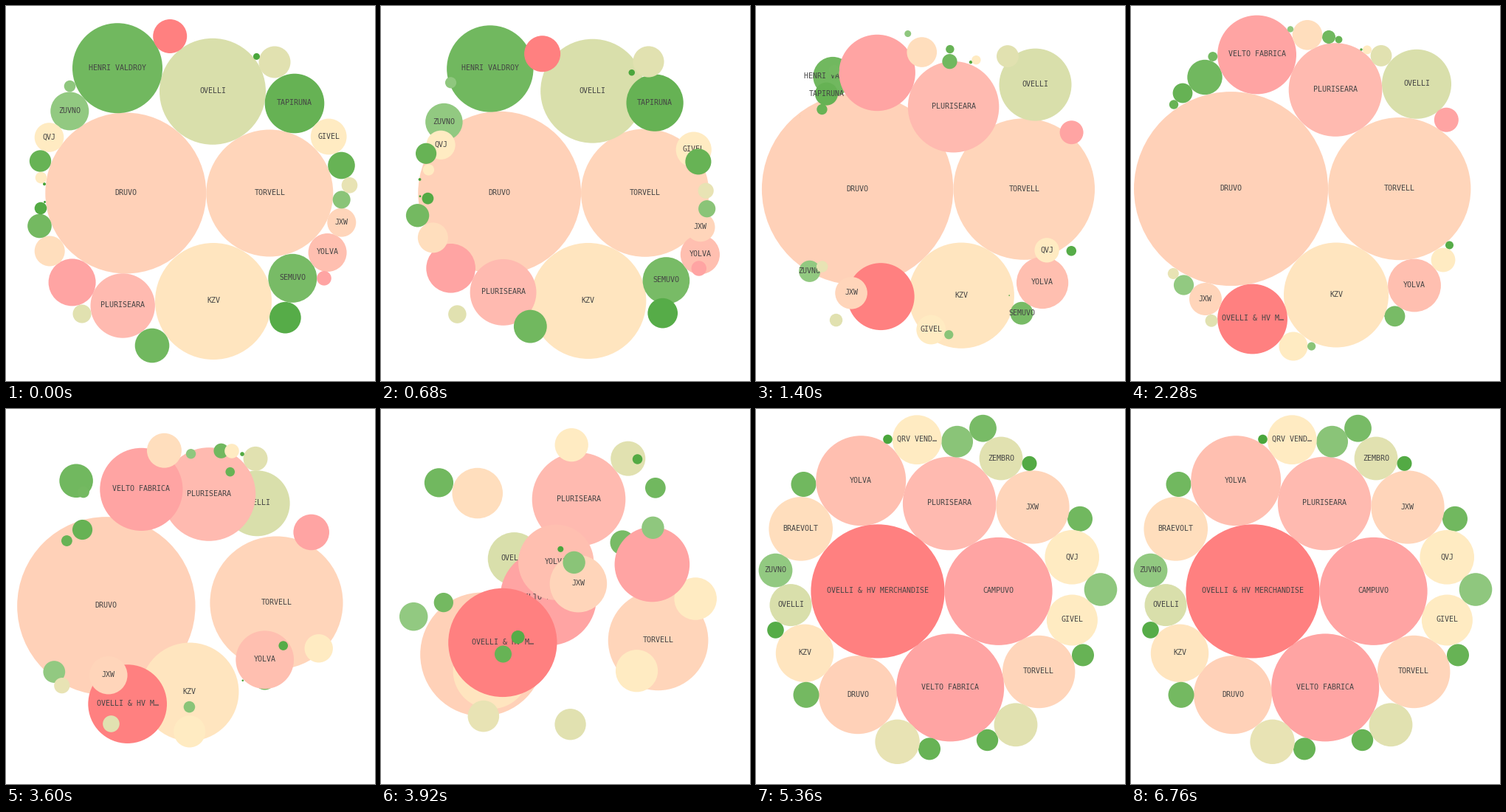
A matplotlib script for the animation above (6800 ms loop, 500 by 508 pixels).

```python
import numpy as np
import matplotlib.pyplot as plt
from matplotlib.animation import FuncAnimation
from matplotlib.colors import to_rgb

W, H, DPI = 500, 508, 100
FRAMES, STEP = 170, 40
MOVE_MS = 1500
MOVE_STARTS = (306, 3112)
CHAR_W = 6.05

# Largest first, which is also the stacking order; unnamed bubbles stay blank.
NAMES = [
    "DRUVO", "TORVELL", "KZV", "OVELLI", "HENRI VALDROY", "PLURISEARA",
    "TAPIRUNA", "SEMUVO", "VELTO FABRICA", "YOLVA", "ZUVNO", "GIVEL", "",
    "OVELLI & HV MERCHANDISE", "ZEMBRO", "", "BRAEVOLT", "QVJ", "JXW",
    "", "", "", "", "", "", "CAMPUVO", "", "QRV VENDORS", "", "", "", "",
]

# Each layout holds x, y, radius per bubble.
FIRST = [
    (162.3, 253.5, 109), (357.3, 253.5, 86), (281, 400, 79), (280, 115.8, 72),
    (151, 84.2, 61), (158.2, 406, 43.7), (391, 132, 40.3), (388.3, 368.8, 33),
    (89.6, 374.4, 32), (435.6, 334, 26), (86.3, 142.4, 26), (437.2, 177, 24.4),
    (198, 460, 23.3), (222.2, 41, 23), (364, 76, 21.5), (378.4, 422.2, 21.3),
    (59.2, 332, 20.5), (58.5, 178, 19.8), (454.8, 293.2, 19.5),
    (454.5, 216, 18.3), (45.5, 298, 16.3), (46.5, 210, 14.7),
    (103, 417, 12.5), (454.7, 262.4, 12), (465.5, 242.8, 10.8),
    (431, 368.8, 9.8), (47, 274, 8.3), (47.5, 232.6, 7.8), (86.5, 108.6, 7.8),
    (339.5, 68.4, 4.5), (52, 241.2, 2), (52.5, 265.5, 1.5),
]
SECOND = [
    (135.5, 247.6, 131.5), (363.8, 247.6, 96.6), (278, 391.5, 71),
    (387, 105.8, 47), (100, 96.5, 23.7), (277, 113.5, 63.3),
    (70, 118, 13.4), (357.5, 420.3, 13.9), (170.6, 66, 53.4),
    (384, 378.5, 35.9), (71.5, 378, 13.6), (220, 461, 19.5),
    (268, 42, 9), (164.6, 424, 47.4), (339, 67.4, 14.4), (431.5, 324, 5.5),
    (239, 39.3, 20.3), (423, 344, 16.4), (101, 397, 22), (58, 133.5, 6.2),
    (110.8, 68.5, 6.4), (281.5, 45.5, 4.9), (109, 426.3, 8.4),
    (244.6, 461, 5.6), (57.3, 362.5, 7.5), (427.3, 154.2, 16.5),
    (312, 59, 1.7), (320, 59.4, 6), (216, 31.4, 4.2), (343.5, 420, 0.5),
    (60.3, 140.5, 0), (60.3, 140.5, 0),
]
THIRD = [
    (138, 387.2, 53), (383.2, 356, 49.2), (66, 330.8, 39.2), (47, 265.6, 28.5),
    (64.5, 102, 17), (262.2, 128, 63.3), (313.5, 448.5, 14.7),
    (307.5, 26.2, 18.4), (263.2, 377.4, 73), (142.2, 97.2, 61),
    (26.5, 218.6, 22.9), (428.4, 286, 34.5), (439, 148.8, 17),
    (165, 246.9, 90.6), (332, 67, 29.4), (26.5, 299.4, 11.3),
    (60.7, 162.4, 43.3), (428.2, 200.8, 36.8), (375, 133, 49.6),
    (235, 460.4, 15), (68, 387.3, 17.5), (443, 333.4, 15), (352, 427.8, 29.4),
    (272.6, 44.2, 21.4), (191.6, 450.8, 30.2), (328.6, 246.9, 73),
    (370.5, 73.8, 10), (218.2, 41.7, 33.4), (467, 244.5, 22.3),
    (178.5, 41, 6.3), (60.3, 140.5, 0), (60.3, 140.5, 0),
]
LAYOUTS = np.array([FIRST, SECOND, THIRD], float)

# Fill depends on the radius in the last layout.
STOPS = {
    0: "#46a338", 6.5: "#4aa63c", 11.5: "#57ac48", 15: "#67b355",
    18.5: "#79bb66", 23: "#93c982", 28.5: "#d9dfab", 30.5: "#ebe4b5",
    33: "#ffebc2", 36.8: "#ffebc2", 39.5: "#ffe4bf", 49.5: "#ffd5ba",
    53.5: "#ffd0b8", 61: "#ffbfb0", 63.5: "#ffbab0", 73: "#ffa4a3",
    90.6: "#ff8080",
}


def fill(radius):
    rgb = np.array([to_rgb(c) for c in STOPS.values()])
    return [np.interp(radius, list(STOPS), rgb[:, k]) for k in range(3)]


def label(name, radius):
    """Full name if it fits, a shortened one in big bubbles, else nothing."""
    if radius >= 19 and 2 * radius - CHAR_W * len(name) >= 12:
        return name
    if radius >= 33 and len(name) > 10:
        return name[:int((2 * radius - 8) / CHAR_W) - 1] + "…"
    return ""


def ease(t):
    t = min(max(t, 0), 1)
    return 4 * t ** 3 if t < 0.5 else 1 - 4 * (1 - t) ** 3


LABELS = [[label(n, r) for n, r in zip(NAMES, lay[:, 2])] for lay in LAYOUTS]

fig = plt.figure(figsize=(W / DPI, H / DPI), dpi=DPI, facecolor="white")
ax = fig.add_axes([0, 0, 1, 1])
ax.set(xlim=(0, W), ylim=(H, 0))
ax.axis("off")

bubbles, texts = [], []
for i, (x, y, r) in enumerate(LAYOUTS[0]):
    bubbles.append(ax.add_patch(plt.Circle(
        (x, y), r, fc=fill(LAYOUTS[2, i, 2]), lw=0, zorder=2 * i + 1)))
    texts.append(ax.text(
        x, y, "", family="DejaVu Sans Mono", size=7.2, color="#444444",
        ha="center", va="baseline", zorder=2 * i + 2))


def update(frame):
    ms = frame * STEP
    pose = LAYOUTS[0]
    done = 0
    for k, start in enumerate(MOVE_STARTS):
        t = (ms - start) / MOVE_MS
        pose = pose + (LAYOUTS[k + 1] - pose) * ease(t)
        done += t >= 1
    for bubble, text, word, (x, y, r) in zip(bubbles, texts, LABELS[done], pose):
        bubble.center = x, y
        bubble.set_radius(r)
        bubble.set_visible(r > 0.05)
        text.set_position((x, y + 2.5))
        text.set_text(word)
    return bubbles + texts


anim = FuncAnimation(fig, update, frames=FRAMES, interval=STEP,
                     repeat=True, repeat_delay=0, blit=False)
plt.show()
```
